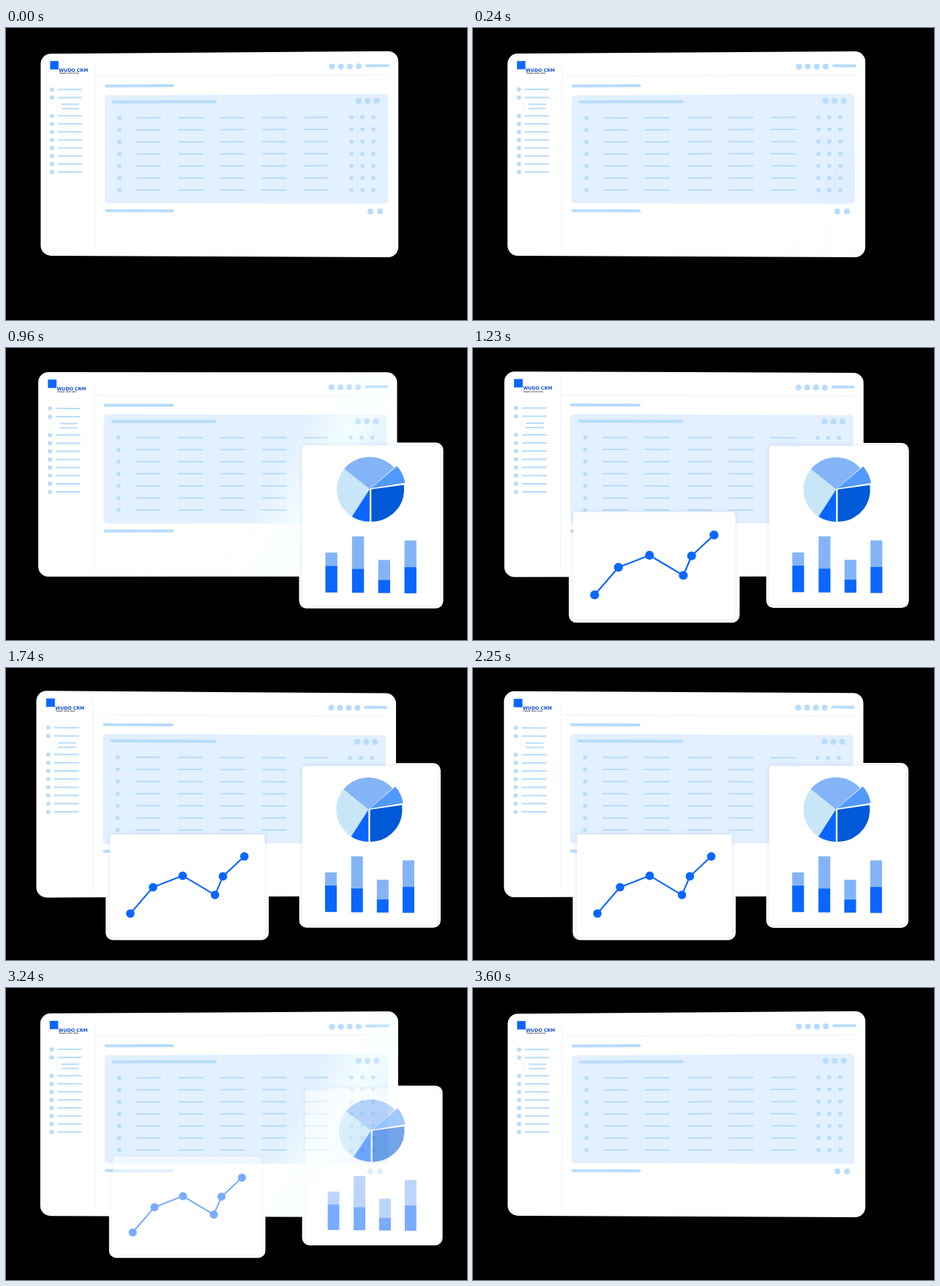
An HTML page with a canvas that plays this animation: 630x400 px, repeating every 3750 ms.

```html
<!DOCTYPE html>
<html lang="en">
<head>
<meta charset="utf-8">
<title>Dashboard</title>
<style>
  html, body { margin: 0; width: 100%; height: 100%; overflow: hidden; background: #000; }
  canvas { display: block; }
</style>
</head>
<body>
<canvas id="stage" width="630" height="400"></canvas>
<script>
const LOOP = 3750, SWAY = 3600, STEP = 30;
const BLUE = '#0a66ff', SKY = '#84b4f8', PALE = '#b8dcfc', TABLE = '#e2f0ff';

const stage = document.getElementById('stage').getContext('2d');
const layerCanvas = document.createElement('canvas');
layerCanvas.width = 630;
layerCanvas.height = 400;
const layer = layerCanvas.getContext('2d');

const clamp = v => Math.min(1, Math.max(0, v));
const smooth = v => v * v * (3 - 2 * v);
const rad = deg => deg * Math.PI / 180;

let sway = 0; // 0 = turned right, 1 = turned left

// Approximate perspective of the large window as it turns.
function warp(x, y) {
  const dx = x - 330;
  return [x - sway * 7.5e-5 * dx * dx, y + (0.5 - sway) * 8.5e-5 * dx * (y - 205)];
}

function warpedRect(x0, y0, x1, y1, r) {
  const p = [warp(x0, y0), warp(x1, y0), warp(x1, y1), warp(x0, y1)];
  const path = new Path2D();
  path.moveTo((p[0][0] + p[1][0]) / 2, (p[0][1] + p[1][1]) / 2);
  for (const i of [1, 2, 3, 0]) path.arcTo(...p[i], ...p[(i + 1) % 4], r);
  path.closePath();
  return path;
}

function dot(x, y, r) {
  stage.beginPath();
  stage.arc(...warp(x, y), r, 0, 7);
  stage.fillStyle = PALE;
  stage.fill();
}

function bar(x0, x1, y, width, color = PALE) {
  const inset = width / 2;
  stage.beginPath();
  stage.moveTo(...warp(x0 + inset, y));
  stage.lineTo(...warp(x1 - inset, y));
  stage.lineWidth = width;
  stage.lineCap = 'round';
  stage.strokeStyle = color;
  stage.stroke();
}

function rule(x0, y0, x1, y1) {
  stage.beginPath();
  stage.moveTo(...warp(x0, y0));
  stage.lineTo(...warp(x1, y1));
  stage.lineWidth = 1;
  stage.strokeStyle = '#eaf4fd';
  stage.stroke();
}

function label(text, x, y, font, color) {
  stage.font = font;
  stage.fillStyle = color;
  stage.fillText(text, ...warp(x, y));
}

function drawShine(area, x, strength) {
  const nx = 56, ny = 30;
  const g = stage.createLinearGradient(x - nx, 166 - ny, x + nx, 166 + ny);
  g.addColorStop(0, 'rgba(244,255,255,0)');
  g.addColorStop(0.45, 'rgba(244,255,255,1)');
  g.addColorStop(0.6, 'rgba(244,255,255,.8)');
  g.addColorStop(0.75, 'rgba(244,255,255,.4)');
  g.addColorStop(1, 'rgba(244,255,255,0)');
  stage.globalAlpha = strength;
  stage.fillStyle = g;
  stage.fill(area);
  stage.globalAlpha = 1;
}

function drawWindow(panel, t) {
  stage.fillStyle = '#fff';
  stage.fill(panel);

  stage.fillStyle = BLUE;
  stage.fill(warpedRect(60.3, 43.5, 71.8, 55, 0));
  label('WUDO CRM', 72.3, 58.2, 'bold 6.2px "DejaVu Sans", sans-serif', '#1450c8');
  label('Simple client desk', 73, 61.4, '600 3px Inter, sans-serif', '#3c4a66');

  rule(122, 44, 122, 305);
  rule(122, 65, 524, 65);

  const navRow = y => { dot(63, y, 2.9); bar(70.5, 104, y, 2); };
  navRow(83);
  navRow(94.2);
  rule(70.5, 100, 70.5, 111);
  bar(76, 100, 103.5, 2);
  bar(76, 100, 109.5, 2);
  for (let i = 0; i < 8; i++) navRow(119.4 + i * 11.1);

  for (let i = 0; i < 4; i++) dot(445.5 + i * 12.2, 53.6, 4);
  bar(491, 524, 52.8, 4);
  bar(135, 229.5, 78.5, 4);

  const table = warpedRect(135, 91.2, 522, 240.4, 5);
  stage.fillStyle = TABLE;
  stage.fill(table);
  const shineX = t < 1900 ? 170 + 0.7 * (t - 570) : 216 + 0.7 * (t - 2880);
  drawShine(table, shineX, 0.8);

  bar(145, 288, 100.6, 4);
  for (let i = 0; i < 3; i++) dot(482 + i * 12.3, 100.4, 4);
  for (let row = 0; row < 7; row++) {
    const y = 122.7 + row * 16.55;
    dot(155, y, 2.8);
    for (let col = 0; col < 5; col++) bar(178 + col * 57.2, 212 + col * 57.2, y, 2);
    for (let i = 0; i < 3; i++) dot(472 + i * 15, y, 2.8);
  }

  bar(135, 229.5, 250.6, 4);
  dot(498, 251, 4);
  dot(511, 251, 4);
  drawShine(panel, shineX, 0.3);
}

function slice(ctx, cx, cy, r, from, to, color) {
  ctx.beginPath();
  ctx.moveTo(cx, cy);
  ctx.arc(cx, cy, r, rad(from), rad(to));
  ctx.closePath();
  ctx.fillStyle = color;
  ctx.fill();
}

function drawCharts(ctx) {
  slice(ctx, 495.3, 193.9, 44, 219, 318.4, SKY);
  slice(ctx, 495.3, 193.9, 44, 122.6, 219, '#c9e6f8');
  slice(ctx, 495.3, 193.9, 44, 90, 122.6, BLUE);
  slice(ctx, 497.2, 192.7, 46.2, -41, -9.5, '#5299ff');
  slice(ctx, 497.6, 194, 44, -8, 90, '#0059d6');

  const columns = [[436, 280, 298], [471.7, 258, 302], [506.8, 290, 317], [542, 263.5, 299.7]];
  columns.forEach(([x, top, split], i) => {
    ctx.fillStyle = SKY;
    ctx.fillRect(x, top, 16, split - top);
    ctx.fillStyle = BLUE;
    ctx.fillRect(x, split, 16, 334.2 + i * 0.4 - split);
  });
}

function drawTrend(ctx) {
  const points = [[170, 336.3], [201, 300.3], [241.5, 284.6], [285.6, 310.9], [296.4, 285.4], [325.6, 258.1]];
  ctx.beginPath();
  points.forEach(p => ctx.lineTo(...p));
  ctx.lineWidth = 2.1;
  ctx.lineJoin = 'round';
  ctx.strokeStyle = BLUE;
  ctx.stroke();
  ctx.fillStyle = BLUE;
  for (const [x, y] of points) {
    ctx.beginPath();
    ctx.arc(x, y, 5.8, 0, 7);
    ctx.fill();
  }
}

const cards = [
  { start: 220, box: [404.7, 134.3, 590, 351.3], halo: [400.7, 130.3, 594, 355.8], pivot: [497.5, 243], turns: true, draw: drawCharts },
  { start: 950, box: [142, 228, 353.5, 368], halo: [136.3, 224, 359, 372.7], pivot: [248, 298], turns: false, draw: drawTrend }
];

function roundBox(ctx, [x0, y0, x1, y1], r) {
  ctx.beginPath();
  ctx.roundRect(x0, y0, x1 - x0, y1 - y0, r);
  ctx.fillStyle = '#fff';
  ctx.fill();
}

function cardState(card, t) {
  const enter = clamp((t - card.start) / 1000);
  const leave = clamp((t - 2480) / 1120);
  return {
    alpha: smooth(clamp((t - card.start) / 300)) * (1 - leave ** 2),
    zoom: 1 + 0.13 * (1 - enter) ** 3 - 0.13 * leave ** 3
  };
}

function place(ctx, card, zoom) {
  const [px, py] = card.pivot;
  ctx.translate(px, py);
  ctx.scale(zoom, zoom);
  ctx.translate(-px, -py);
  if (card.turns) {
    const away = 1 - sway;
    ctx.translate(401, 243);
    ctx.scale(1 + 0.039 * away, 1 + 0.012 * away);
    ctx.translate(-401, -243);
  }
}

// Outside the window a card has a hard white margin, or is not there at all.
function drawMargin(card, { alpha, zoom }) {
  if (alpha < 0.5) return;
  stage.save();
  place(stage, card, zoom);
  roundBox(stage, card.halo, 10);
  stage.restore();
}

function drawCard(card, { alpha, zoom }, panel) {
  if (alpha <= 0) return;
  layer.clearRect(0, 0, 630, 400);
  layer.save();
  place(layer, card, zoom);
  layer.shadowColor = 'rgba(0,50,110,.12)';
  layer.shadowBlur = 6;
  roundBox(layer, card.box, 4);
  layer.shadowColor = 'transparent';
  card.draw(layer);
  layer.restore();

  stage.save();
  if (alpha < 0.5) stage.clip(panel);
  stage.globalAlpha = alpha;
  stage.drawImage(layerCanvas, 0, 0);
  stage.restore();
}

function render(t) {
  sway = (1 - Math.cos(2 * Math.PI * t / SWAY)) / 2;
  const panel = warpedRect(47.4, 33.2, 536.2, 313.2, 14);
  const states = cards.map(card => cardState(card, t));
  stage.fillStyle = '#000';
  stage.fillRect(0, 0, 630, 400);
  cards.forEach((card, i) => drawMargin(card, states[i]));
  drawWindow(panel, t);
  cards.forEach((card, i) => drawCard(card, states[i], panel));
}

const begin = performance.now();
function tick() {
  const t = (performance.now() - begin) % LOOP;
  render(Math.min(SWAY, Math.floor(t / STEP) * STEP));
  requestAnimationFrame(tick);
}
tick();
</script>
</body>
</html>
```
